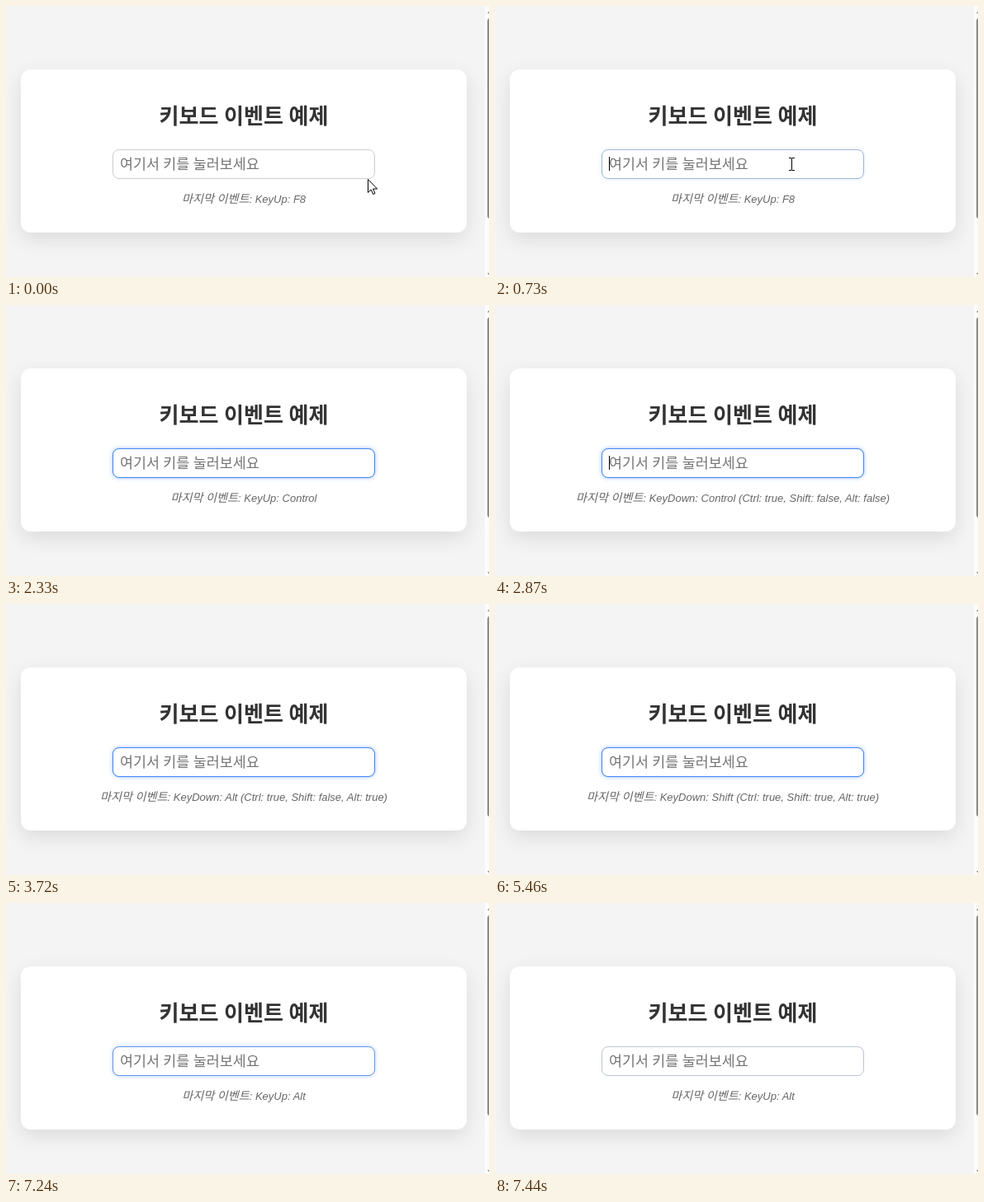
Write an HTML page that moves like this. It is 585 px wide and 329 px high and loops after 8 s.

```html
<!DOCTYPE html>
<html lang="ko">
<head>
<meta charset="utf-8">
<title>키보드 이벤트 예제</title>
<style>
  html, body { margin: 0; width: 100%; height: 100%; overflow: hidden; background: #f4f4f4; }
  div, svg { position: absolute; box-sizing: border-box; }
  .card { left: 18px; top: 77px; width: 540px; height: 198px; border-radius: 12px;
    background: #fff; box-shadow: 0 8px 24px rgba(0, 0, 0, .1); }
  .field { left: 129px; top: 174px; width: 318px; height: 36px; border-radius: 8px;
    border: 1px solid #ccc; background: #fff; }
  #focus { border-color: #4285f4; box-shadow: 0 0 5px rgba(66, 133, 244, .5); }
  svg { left: 0; top: 0; }
  text { font-family: "Liberation Sans", "Noto Sans CJK KR", "Noto Sans CJK", sans-serif; }
  .ko { font-size: 1.087em; word-spacing: -.024em; }
</style>
</head>
<body>
<div class="card"></div>
<div class="field"></div>
<div class="field" id="focus"></div>
<svg width="585" height="329">
  <text x="288" y="143" font-size="24" font-weight="bold" fill="#333" text-anchor="middle"><tspan class="ko">키보드 이벤트 예제</tspan></text>
  <text x="138" y="197.5" font-size="16" fill="#757575"><tspan class="ko">여기서 키를 눌러보세요</tspan></text>
  <text x="288" y="239" font-size="13" font-style="italic" fill="#666" text-anchor="middle"><tspan class="ko">마지막 이벤트</tspan><tspan id="status"></tspan></text>
  <rect id="caret" x="138" y="183" width="1" height="17" fill="#000"/>
  <rect x="580" width="5" height="329" fill="#fcfcfc"/>
  <rect x="583" y="15" width="6" height="243" rx="3" fill="#8b8b8b"/>
  <path d="M583 9l3-4v4zM583 324h3v4z" fill="#8b8b8b"/>
  <path id="arrow" d="M.5 .5V16.5L4.2 13 6.7 18.5 9 17.5 6.6 12H11.6Z" fill="#fff" stroke="#000"/>
  <path id="beam" d="M0 .5H3L3.5 1 4 .5H7M3.5 1V15M0 15.5H3L3.5 15 4 15.5H7" fill="none" stroke="#000"/>
</svg>
<script>
const LOOP = 8000;
const $ = id => document.getElementById(id);
const down = (key, ctrl, shift, alt) =>
  `KeyDown: ${key} (Ctrl: ${ctrl}, Shift: ${shift}, Alt: ${alt})`;
const control = down('Control', true, false, false);

// Each track holds [start time, value] steps.
const status = [
  [0, 'KeyUp: F8'], [1740, control], [2070, 'KeyUp: Control'], [2870, control],
  [3720, down('Alt', true, false, true)], [5130, down('Shift', true, true, true)],
  [5980, 'KeyUp: Shift'], [6050, 'KeyUp: Alt']
];
const focus = [
  [0, 0], [730, .3], [800, .8], [870, 1],
  [7240, .75], [7310, .4], [7370, .18], [7440, .08]
];
const pointer = [
  [0, ['arrow', 438, 210]], [70, ['beam', 404, 193]], [140, ['beam', 372, 187]],
  [210, ['beam', 356, 184]], [1130, ['arrow', 350, 235]], [1200, null]
];
const blinks = [730, 1270, 1800, 2330, 2870, 3390, 3930, 4450, 4990, 5460, 5980, 6520, 7040, 7240];

const at = (track, t) => track.filter(([start]) => start <= t).pop()[1];
const show = (el, on) => el.setAttribute('visibility', on ? 'visible' : 'hidden');

function draw(now) {
  const t = now % LOOP;
  $('status').textContent = ': ' + at(status, t);
  $('focus').style.opacity = at(focus, t);
  show($('caret'), blinks.filter(b => b <= t).length % 2);
  const [shape, x, y] = at(pointer, t) || [];
  for (const id of ['arrow', 'beam']) {
    show($(id), id === shape);
    if (id === shape) $(id).setAttribute('transform', `translate(${x} ${y})`);
  }
}

const begin = performance.now();
function tick() {
  draw(performance.now() - begin);
  requestAnimationFrame(tick);
}
tick();
</script>
</body>
</html>
```
